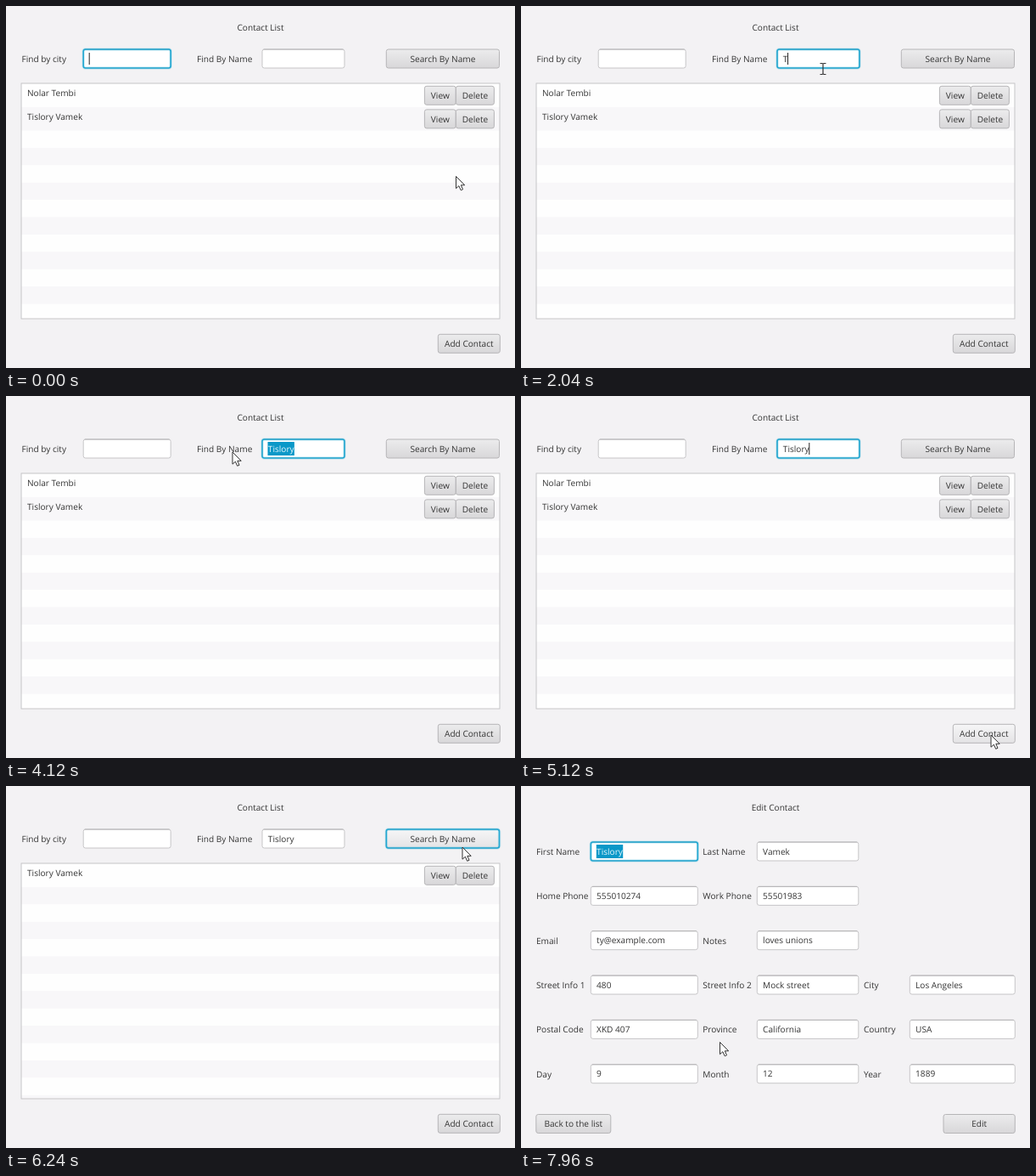
Animation of 600x426 px, one loop 8 s. Source, as an HTML page:

```html
<!DOCTYPE html>
<html lang="en">
<head>
<meta charset="utf-8">
<title>Contact List</title>
<style>
  html, body { margin: 0; width: 100%; height: 100%; overflow: hidden; background: #f3f2f4; }
  svg { display: block; width: 100%; height: 100%; }
  text { font: 10.1px "Open Sans", sans-serif; fill: #353535; text-rendering: geometricPrecision; white-space: pre; }
  .mid { text-anchor: middle; }
  .button { fill: url(#plain); stroke: #b6b5b7; }
  .button.hover { fill: url(#light); }
  .field { fill: #fff; stroke: #c6c5c7; }
  .shade { stroke: #b5b4b6; }
  .ring { fill: none; stroke: #22a8d2; stroke-width: 1.6; }
  .glow { fill: none; stroke: #22a8d2; stroke-width: 3.4; opacity: .2; }
  .selection { fill: #0a98c8; }
  .caret { stroke: #222; }
  .selected { fill: #e8f7fc; }
</style>
</head>
<body>
<svg viewBox="0 0 600 426">
  <defs>
    <linearGradient id="plain" x2="0" y2="1"><stop stop-color="#ececed"/><stop offset="1" stop-color="#d8d7d9"/></linearGradient>
    <linearGradient id="light" x2="0" y2="1"><stop stop-color="#f6f6f7"/><stop offset="1" stop-color="#e4e3e5"/></linearGradient>
  </defs>
</svg>
<script>
const LOOP = 8000, STEP = 40;
const FOCUS_AT = 1320, DRAG_AT = 3960, DESELECT_AT = 4840, FILTER_AT = 5800, EDIT_AT = 6560;
const FIRST = "Tislory", LAST = "Vamek", OTHER = "Nolar Tembi";

// time, x, y of the pointer
const PATH = [
  [0, 530.5, 200.5], [160, 447, 227], [640, 447, 227], [1160, 356, 74],
  [3120, 356, 74], [3480, 556, 119], [3600, 556, 119], [3920, 343, 64],
  [4120, 267, 66], [4400, 267, 66], [4760, 345, 65], [4840, 345, 65],
  [5120, 554, 399], [5280, 554, 399], [5640, 530, 62], [5880, 530, 62],
  [6160, 538, 72], [6280, 538, 72], [6480, 509.5, 103], [7320, 509.5, 103],
  [7440, 509.5, 103.8], [7600, 509.5, 103.8], [7960, 234.5, 301.5]
];
const KEY_TIMES = [2040, 2280, 2400, 2520, 2640, 2760, 2880];

const svg = document.querySelector("svg");
const buttons = [], fields = [];

function add(parent, tag, attrs = {}, content = "") {
  const node = document.createElementNS("http://www.w3.org/2000/svg", tag);
  for (const key in attrs) node.setAttribute(key, attrs[key]);
  node.textContent = content;
  return parent.appendChild(node);
}
const show = (node, on) => node.setAttribute("visibility", on ? "inherit" : "hidden");
const label = (parent, x, middle, content, cls = "") =>
  add(parent, "text", { x, y: middle + 3.7, class: cls }, content);

function ring(parent, x, y, width, height) {
  const group = add(parent, "g");
  for (const cls of ["glow", "ring"]) add(group, "rect", { x, y, width, height, rx: 2.5, class: cls });
  return group;
}

function button(page, x, y, width, content) {
  const height = 22;
  const node = add(page, "rect", { x, y, width, height, rx: 2.5, class: "button" });
  label(page, x + width / 2, y + 11.2, content, "mid");
  buttons.push({ page, node, x, y, width, height });
}

function field(page, x, y, width, content = "") {
  const height = 22;
  add(page, "rect", { x, y, width, height, rx: 2.5, class: "field" });
  add(page, "path", { d: `M${x + 1.5} ${y}h${width - 3}`, class: "shade" });
  const focus = ring(page, x, y, width, height);
  const selection = add(page, "rect", { x: x + 6.5, y: y + 3, height: 16, class: "selection" });
  const text = label(page, x + 6.8, y + 10.8, content);
  const caret = add(page, "path", { d: `M0 ${y + 4}v14`, class: "caret" });
  [focus, selection, caret].forEach(part => show(part, false));
  const made = { page, x, y, width, height, focus, selection, text, caret };
  fields.push(made);
  return made;
}

// mode: "" idle, "caret" or "selection"; from is the first selected letter
function setField(f, mode, content = f.text.textContent, from = 0) {
  f.text.textContent = content;
  const end = content ? f.text.getComputedTextLength() : 0;
  const start = content && from ? f.text.getSubStringLength(0, from) : 0;
  f.caret.setAttribute("transform", `translate(${f.x + 7 + end} 0)`);
  f.selection.setAttribute("x", f.x + 6.5 + start);
  f.selection.setAttribute("width", end - start + .6);
  f.text.setAttribute("class", mode === "selection" && !from ? "selected" : "");
  show(f.focus, mode);
  show(f.caret, mode === "caret");
  show(f.selection, mode === "selection");
}

// List page
const listPage = add(svg, "g");
label(listPage, 300, 25.5, "Contact List", "mid");
label(listPage, 18.5, 62.7, "Find by city");
label(listPage, 225, 62.7, "Find By Name");
const cityField = field(listPage, 91.2, 51, 103);
const nameField = field(listPage, 302, 51, 97);
button(listPage, 448.3, 51, 133.2, "Search By Name");
const searchRing = ring(listPage, 448.3, 51, 133.2, 22);
button(listPage, 509.3, 386.3, 73, "Add Contact");
add(listPage, "rect", { x: 18, y: 91, width: 564, height: 277, fill: "#fefefe" });

function rows(names) {
  const group = add(listPage, "g");
  const tall = 27.6, low = 20.4;
  for (let i = 0, y = 91.3; y < 367; i++) {
    const height = Math.min(i < names.length ? tall : low, 368 - y);
    if (i % 2) add(group, "rect", { x: 18, y, width: 564, height, fill: "#f8f7f9" });
    if (i < names.length) {
      label(group, 25, y + 10.9, names[i]);
      button(group, 493.4, y + 3, 36.8, "View");
      button(group, 530.4, y + 3, 45, "Delete");
    }
    y += height;
  }
  return group;
}
const allRows = rows([OTHER, `${FIRST} ${LAST}`]);
const foundRows = rows([`${FIRST} ${LAST}`]);
add(listPage, "rect", { x: 18, y: 91, width: 564, height: 277, fill: "none", stroke: "#c6c5c7" });

// Edit page
const editPage = add(svg, "g");
label(editPage, 300, 25.5, "Edit Contact", "mid");
const COLUMNS = [[18, 82.3, 126], [214.3, 278.3, 119.5], [404, 458.3, 124]];
const FORM = [
  ["First Name", FIRST, "Last Name", LAST],
  ["Home Phone", "555010274", "Work Phone", "55501983"],
  ["Email", "ty@example.com", "Notes", "loves unions"],
  ["Street Info 1", "480", "Street Info 2", "Mock street", "City", "Los Angeles"],
  ["Postal Code", "XKD 407", "Province", "California", "Country", "USA"],
  ["Day", "9", "Month", "12", "Year", "1889"]
];
FORM.forEach((row, r) => {
  const middle = 77 + r * 52.35;
  for (let i = 0; i < row.length; i += 2) {
    const [labelX, x, width] = COLUMNS[i / 2];
    label(editPage, labelX, middle + .3, row[i]);
    field(editPage, x, middle - 11, width, row[i + 1]);
  }
});
button(editPage, 17.8, 386.5, 88, "Back to the list");
button(editPage, 498, 386.5, 84.3, "Edit");
const firstNameField = fields.find(f => f.page === editPage);

// Pointer
const arrow = add(svg, "path", {
  d: "M0 0V14.2L3.4 11.2L5.7 16.3L8 15.3L5.8 10.3H10.2Z",
  fill: "#fff", stroke: "#333", "stroke-width": 1, "stroke-linejoin": "round"
});
const beam = add(svg, "path", {
  d: "M-3.5 -6.5H-1L0 -5.8L1 -6.5H3.5M0 -6V6M-3.5 6.5H-1L0 5.8L1 6.5H3.5",
  fill: "none", stroke: "#333", "stroke-width": 1.2
});

function pointerAt(t) {
  const next = PATH.findIndex(p => p[0] > t);
  if (next < 0) return PATH[PATH.length - 1].slice(1);
  const [t0, x0, y0] = PATH[next - 1], [t1, x1, y1] = PATH[next];
  const k = (t - t0) / (t1 - t0), ease = k * k * (3 - 2 * k);
  return [x0 + (x1 - x0) * ease, y0 + (y1 - y0) * ease];
}

function draw(now) {
  const t = Math.floor(now % LOOP / STEP) * STEP;
  const editing = t >= EDIT_AT, filtered = t >= FILTER_AT;
  const pages = editing ? [editPage] : [listPage, filtered ? foundRows : allRows];
  for (const page of [listPage, allRows, foundRows, editPage]) show(page, pages.includes(page));
  show(searchRing, filtered && !editing);

  const typed = FIRST.slice(0, KEY_TIMES.filter(k => t >= k).length);
  const dragging = t >= DRAG_AT && t < DESELECT_AT;
  const nameMode = t < FOCUS_AT || filtered ? "" : dragging ? "selection" : "caret";
  const firstSelected = t === DRAG_AT ? FIRST.length - 1 : 0;
  if (editing) {
    setField(cityField, "");
    setField(nameField, "");
    setField(firstNameField, "selection");
  } else {
    setField(cityField, t < FOCUS_AT ? "caret" : "");
    setField(nameField, nameMode, typed, firstSelected);
    setField(firstNameField, "");
  }

  const [x, y] = pointerAt(t);
  const over = (b, margin = 0) => pages.includes(b.page) &&
    x >= b.x && x <= b.x + b.width && y >= b.y && y <= b.y + b.height + margin;
  for (const b of buttons) b.node.classList.toggle("hover", over(b));
  const inField = fields.some(f => over(f, 2));
  for (const shape of [arrow, beam]) shape.setAttribute("transform", `translate(${x} ${y})`);
  show(arrow, !inField);
  show(beam, inField);
}

const begin = performance.now();
function tick() {
  draw(performance.now() - begin);
  requestAnimationFrame(tick);
}
tick();
</script>
</body>
</html>
```
